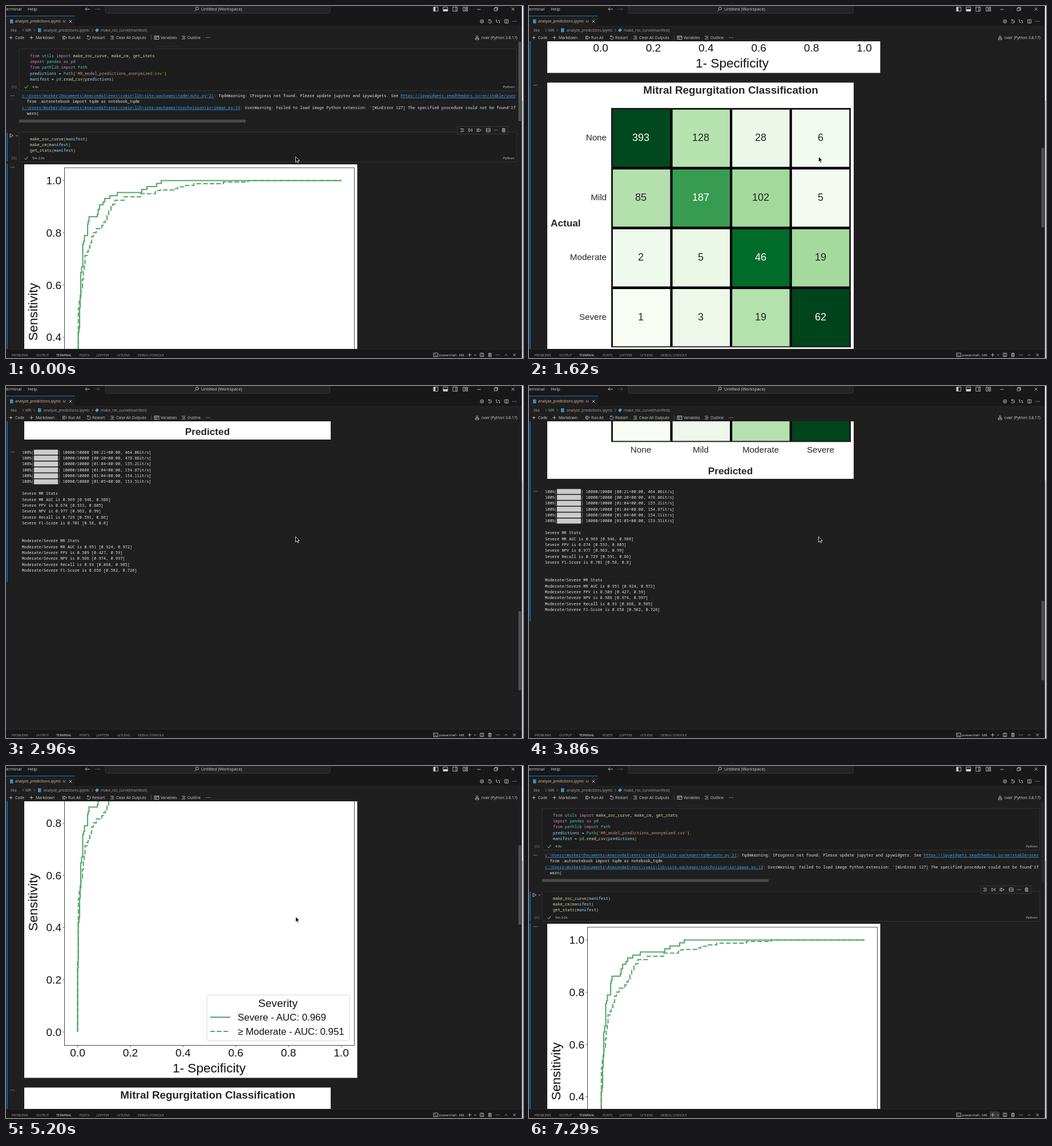
An HTML page for the animation above (7.46 s loop, 906 by 618 pixels).

```html
<!DOCTYPE html>
<html lang="en">
<head>
<meta charset="utf-8">
<title>Notebook scroll</title>
<style>
html, body { margin: 0; width: 100%; height: 100%; overflow: hidden; background: #1f1f1f; }
svg { display: block; width: 100vw; height: 100vh; }
text { white-space: pre; font-family: "Open Sans", "Noto Sans", sans-serif; }
.mono { font-family: "Noto Sans Mono", "DejaVu Sans Mono", monospace; font-weight: 500; }
.plot { font-family: "Liberation Sans", Arial, sans-serif; }
</style>
</head>
<body>
<svg id="stage" viewBox="0 0 906 618" preserveAspectRatio="none"></svg>
<script>
const GREEN = "#55a868", INK = "#262626", GREY = "#d2d2d2", DIM = "#a2a2a2", BLUE = "#0078d4";
const esc = s => String(s).replace(/&/g, "&amp;").replace(/</g, "&lt;");

const rect = (x, y, w, h, fill, more = "") =>
  `<rect x="${x}" y="${y}" width="${w}" height="${h}" fill="${fill}" ${more}/>`;
const line = (d, stroke, w = 0.8, more = "") =>
  `<path d="${d}" fill="none" stroke="${stroke}" stroke-width="${w}" ${more}/>`;
// y is the middle of the letters
const text = (x, y, s, size = 6.7, fill = GREY, more = "") =>
  `<text x="${x}" y="${y + size * 0.36}" font-size="${size}" fill="${fill}" ${more}>${esc(s)}</text>`;
const plotText = (x, y, s, size, anchor = "middle", fill = INK, more = "") =>
  text(x, y, s, size, fill, `class="plot" text-anchor="${anchor}" ${more}`);

// {letter} switches the colour of the text after it
const PEN = { k: "#c586c0", m: "#4ec9b0", f: "#dcdcaa", v: "#9cdcfe", s: "#ce9178",
  b: "#ffd700", w: "#e0e0e0", u: "#3ea6f5" };
function mono(x, y, src) {
  const bits = src.split(/\{(\w)\}/);
  let spans = esc(bits[0]);
  for (let i = 1; i < bits.length; i += 2)
    spans += `<tspan fill="${PEN[bits[i]]}"${bits[i] === "u" ? ' text-decoration="underline"' : ""}>${esc(bits[i + 1])}</tspan>`;
  return `<text class="mono" x="${x}" y="${y + 2.5}" font-size="7" fill="${PEN.w}">${spans}</text>`;
}
const PITCH = 10.38;
const block = (x, y, lines) => lines.map((s, i) => mono(x, y + i * PITCH, s)).join("");

const ICON = {
  plus: "M-3 0H3M0-3V3",
  close: "M-2.3-2.3L2.3 2.3M2.3-2.3L-2.3 2.3",
  down: "M-1.7-.8L0 .9L1.7-.8",
  up: "M-2.2 1.1L0-1.1L2.2 1.1",
  right: "M-1-2.2L1.2 0L-1 2.2",
  dots: "M-3.3 0h1.2M-.6 0h1.2M2.1 0h1.2",
  split: "M-3-3H3V3H-3ZM0-3V3",
  rows: "M-3.3-3H3.3V3H-3.3ZM-3.3 0H3.3",
  trash: "M-3-2.2H3M-1-2.2V-3.2H1V-2.2M-2.2-2.2V3.2H2.2V-2.2M-.7-.8V2M.7-.8V2",
  play: "M-2.4-3.2L3 0L-2.4 3.2Z",
  playBar: "M-3-3V3L1 0ZM2.5-3V3",
  runAll: "M-3.5-3V3M-1.5-3L3.5 0L-1.5 3Z",
  loop: "M-2.2-2A3 3 0 1 1-3 .8M-2.4-3.6V-1.8H-.6",
  clock: "M-2.2-2A3 3 0 1 1-3 .8M-2.4-3.6V-1.8H-.6M0-1.4V.3L1.4 1",
  gear: "M-3 0a3 3 0 1 0 6 0a3 3 0 1 0-6 0M-1 0a1 1 0 1 0 2 0a1 1 0 1 0-2 0",
  diff: "M-2.6-3.2V1.5H0M2.6 3.2V-1.5H0M-3.4-2.4h1.6M1.8 2.4h1.6",
  list: "M-3-2.4H3.2M-1.2 0H3.2M-3 2.4H3.2",
  table: "M-4-3H4V3H-4ZM-4-1H4M-1.2-1V3",
  check: "M-3 .3L-1 2.6L3-2.6",
  find: "M-.9.9L-3.6 3.6M-1.6-1.2a2.5 2.5 0 1 0 5 0a2.5 2.5 0 1 0-5 0",
  back: "M4 0H-4M-1-3L-4 0L-1 3",
  forward: "M-4 0H4M1-3L4 0L1 3",
  box: "M-3-1.8H1.8V3H-3ZM-1.5-1.8V-3.2H3.2V1.6H1.8",
  prompt: "M-3.8-3.2H3.8V3.2H-3.8ZM-2.2-1.4L-.6 0L-2.2 1.4M.2 1.6H2.2",
  pane: "M-4-3.6H4V3.6H-4Z",
  tiles: "M-4-3.5H-.8V3.5H-4ZM1-3.5H4V-.6H1ZM1 .8H4V3.5H1Z",
  user: "M-1.6-1.6a1.6 1.6 0 1 0 3.2 0a1.6 1.6 0 1 0-3.2 0M-3 3.5V1H3V3.5Z"
};
const icon = (name, x, y, color = GREY, w = 0.8) =>
  line(ICON[name], color, w, `transform="translate(${x} ${y})"`);
const dots = (x, y) => icon("dots", x, y, GREY, 1.2);

// Vertical-then-horizontal staircase through [x, y] corners
const stairs = pts => "M" + pts[0] + pts.slice(1).map(([x, y]) => `V${y}H${x}`).join("");

const SEVERE = [[125.5, 765], [126.5, 652], [128, 572], [129, 565], [130, 530], [131, 512], [132.5, 468],
  [134.5, 458], [136, 418], [137.5, 413], [143, 403], [144, 383], [145.5, 378], [160, 370], [161.5, 366],
  [164, 357], [170, 349], [173, 344], [182, 338], [195, 333], [238, 327.5], [247, 322], [264, 317],
  [272, 311.5], [588, 306.5]];
const MODERATE = [[125.5, 765], [126.8, 640], [128.5, 531], [130, 518], [131.5, 508], [134, 495], [135.5, 480],
  [137, 465], [138.5, 452], [142, 438], [144, 432], [147, 425], [150, 416], [153, 405], [158, 398],
  [168, 391], [171, 385], [174, 380], [177, 375], [180, 368], [184, 360], [187, 352], [191, 348],
  [207, 341], [236, 335], [262, 329.5], [270, 324], [294, 323], [301, 320.5], [315, 317.5], [329, 315],
  [381, 312], [424, 309], [588, 306.5]];

function rocFigure() {
  let out = rect(32, 278, 583.5, 567.5, "#fff") +
    rect(102.5, 284, 508, 504.5, "none", `stroke="#333" stroke-width=".9"`);
  for (let i = 0; i <= 5; i++) {
    const x = 125.5 + 92.4 * i, y = 765 - 91.7 * i, label = (i / 5).toFixed(1);
    out += line(`M99.5 ${y}h3M${x} 788.5v3`, "#333") +
      plotText(97, y, label, 19.1, "end", "#111") + plotText(x, 801, label, 19.1, "middle", "#111");
  }
  const dash = `stroke-dasharray="8 3.6"`;
  return out +
    plotText(47, 537, "Sensitivity", 22.6, "middle", "#111", `transform="rotate(-90 47 537)"`) +
    plotText(356, 828, "1- Specificity", 22.6, "middle", "#111") +
    line(stairs(MODERATE), GREEN, 2.1, dash) + line(stairs(SEVERE), GREEN, 2.1) +
    rect(352, 700, 250, 80, "#fff", `rx="2.5" stroke="#d6d6d6" stroke-width="1"`) +
    plotText(476.5, 714, "Severity", 19.1, "middle", "#111") +
    line("M358 739H393", GREEN, 2.1) + line("M358 764H393", GREEN, 2.1, dash) +
    plotText(406, 739, "Severe - AUC: 0.969", 16.9, "start", "#111") +
    plotText(406, 764, "≥ Moderate - AUC: 0.951", 16.9, "start", "#111");
}

const GRADES = ["None", "Mild", "Moderate", "Severe"];
const COUNTS = [[393, 128, 28, 6], [85, 187, 102, 5], [2, 5, 46, 19], [1, 3, 19, 62]];
const SHADES = [
  ["#00481d", "#b5e2ae", "#ecf7e9", "#f3faf0"], ["#b3e0ac", "#379c52", "#a3da9c", "#f4faf1"],
  ["#f0f9ed", "#ebf7e7", "#006b2b", "#a4da9d"], ["#f7fcf5", "#eef8ea", "#b4e1ad", "#00441b"]];

function matrixFigure() {
  const bold = `font-weight="700"`;
  let out = rect(32, 862.5, 537, 529.5, "#fff") +
    plotText(353.5, 875.5, "Mitral Regurgitation Classification", 18.9, "middle", INK, bold) +
    rect(144, 907, 420, 420.3, "#1a1a1a") + rect(147, 910, 414, 414.5, "#000");
  COUNTS.forEach((row, r) => {
    const mid = 958.7 + 105.1 * r;
    out += plotText(136, mid, GRADES[r], 15.2, "end") +
      plotText(196 + 105 * r, 1341, GRADES[r], 15.2);
    row.forEach((n, c) => {
      const dark = parseInt(SHADES[r][c].slice(1, 3), 16) < 100;
      out += rect(147 + 104.6 * c, 910 + 105 * r, 100.4, 100.4, SHADES[r][c]) +
        plotText(196 + 105 * c, mid, n, 18, "middle", dark ? "#fff" : INK);
    });
  });
  return out + plotText(38, 1109, "Actual", 17.2, "start", INK, bold) +
    plotText(353, 1377.5, "Predicted", 17.2, "middle", INK, bold);
}

function stats(name, auc, ppv, npv, recall, f1) {
  const row = (label, v) => `${name} ${label} is ${v}`;
  return [`${name} MR Stats`, row("MR AUC", auc), row("PPV", ppv), row("NPV", npv),
    row("Recall", recall), row("F1-Score", f1)];
}

function statsOutput() {
  const runs = ["00:21 464.06", "00:20 478.86", "01:04 155.21", "01:04 154.87", "01:04 154.11", "01:05 153.51"];
  const bars = runs.map((_, i) => rect(49, 1409.8 + i * PITCH, 42, 8.8, "#cccccc")).join("");
  const progress = runs.map(s => {
    const [took, rate] = s.split(" ");
    return `100%|${" ".repeat(10)}| 10000/10000 [${took}<00:00, ${rate}it/s]`;
  });
  return bars + block(28, 1414, [...progress, "",
    ...stats("Severe", "0.969 [0.946, 0.986]", "0.674 [0.533, 0.805]", "0.977 [0.963, 0.99]",
      "0.729 [0.591, 0.86]", "0.701 [0.58, 0.8]"), "", "",
    ...stats("Moderate/Severe", "0.951 [0.924, 0.972]", "0.509 [0.427, 0.59]", "0.986 [0.974, 0.997]",
      "0.93 [0.868, 0.985]", "0.658 [0.582, 0.726]")]);
}

function cell(top, height, count, time, lines) {
  const foot = top + height - 6.5;
  return rect(23, top, 872, height, "#1d1d1d", `stroke="#373737" stroke-width=".8"`) +
    block(42, top + 11.5, lines) + text(9, foot, count, 5.6, DIM, `class="mono"`) +
    icon("check", 35.5, foot, "#89d185", 1) + text(46, foot, time, 5.9) +
    text(891, foot, "Python", 6.1, GREY, `text-anchor="end"`);
}

function notebook() {
  const site = "{u}c:\\Users\\Worker\\Documents\\Anaconda3\\envs\\cvair\\lib\\site-packages\\";
  return rect(261, 70, 43, 1.5, "#282828") +
    cell(75.5, 73, "[1]", "4.9s", [
      "{k}from {m}utils {k}import {f}make_roc_curve{w}, {f}make_cm{w}, {f}get_stats",
      "{k}import {m}pandas {k}as {m}pd",
      "{k}from {m}pathlib {k}import {m}Path",
      "{v}predictions{w} = {m}Path{b}({s}'MR_model_predictions_anonymized.csv'{b})",
      "{v}manifest{w} = {m}pd{w}.{f}read_csv{b}({v}predictions{b})"]) +
    block(28, 157.5, [
      site + "tqdm\\auto.py:21{w}: TqdmWarning: IProgress not found. Please update jupyter and ipywidgets. See {u}https://ipywidgets.readthedocs.io/en/stable/user",
      "  from .autonotebook import tqdm as notebook_tqdm",
      site + "torchvision\\io\\image.py:13{w}: UserWarning: Failed to load image Python extension: '[WinError 127] The specified procedure could not be found'If",
      "  warn("]) +
    rect(23, 199.5, 397, 5, "#4b4b4b") +
    cell(221.5, 52, "[3]", "5m 2.0s", ["make_roc_curve", "make_cm", "get_stats"]
      .map(f => `{f}${f}{b}({v}manifest{b})`)) +
    rect(791, 211.5, 89, 13.5, "#1f1f1f", `stroke="#3c3c3c" stroke-width=".8"`) +
    [["list", 799], ["playBar", 814], ["runAll", 829], ["rows", 845], ["trash", 872]]
      .map(([n, x]) => icon(n, x, 218)).join("") + dots(858.5, 218) +
    icon("play", 9.5, 227.5) + icon("down", 18.5, 227.5) +
    [157.5, 283, 867, 1414].map(y => dots(11.5, y)).join("") +
    rect(1.2, 222, 1.6, 51, BLUE) + rect(1.2, 277, 1.6, 1365, BLUE) +
    rocFigure() + matrixFigure() + statsOutput();
}

function header() {
  const tools = [["plus", 8.5, 16, "Code"], ["plus", 44.5, 52, "Markdown"], ["runAll", 103, 109, "Run All"],
    ["loop", 145, 151, "Restart"], ["list", 186, 193, "Clear All Outputs"], ["table", 264, 271, "Variables"],
    ["list", 311, 318, "Outline"]];
  return rect(0, 0, 906, 62, "#1f1f1f") + rect(0, 0, 906, 36, "#181818") +
    rect(0, 17, 121, 19.5, "#1f1f1f") + rect(0, 17, 121, 1, BLUE) + rect(121, 35.5, 785, 0.8, "#2b2b2b") +
    text(27.5, 5.5, "Terminal", 7.6, GREY, `text-anchor="end"`) + text(38, 5.5, "Help", 7.8) +
    icon("back", 143, 5.5) + icon("forward", 160, 5.5, "#5c5c5c") +
    rect(174, -6, 394, 19, "#242424", `rx="3" stroke="#3b3b3b" stroke-width=".8"`) +
    icon("find", 334, 5.5) + text(342, 5.5, "Untitled (Workspace)", 7.4) +
    [753, 770, 787].map(x => icon("pane", x, 5.5, "#d7d7d7")).join("") +
    rect(749.5, 2, 3, 7, "#d7d7d7") + rect(766.5, 5.5, 7.5, 3.5, "#d7d7d7") + line("M788.5 2V9", "#d7d7d7") +
    icon("tiles", 805, 5.5, "#d7d7d7") + line("M825.5 6H832", GREY) +
    icon("box", 858.5, 5.5) + icon("close", 888.5, 5.5, GREY, 1) +
    rect(7, 23.5, 5.5, 7, "#3b8fb8", `rx="1"`) + text(16, 27, "analyze_predictions.ipynb", 6.65, "#e2c08d") +
    text(99.5, 27, "M", 5.8, "#c8a878") + icon("close", 113, 27, "#e0e0e0", 0.9) +
    [["gear", 834], ["clock", 848], ["diff", 862], ["split", 877]].map(([n, x]) => icon(n, x, 27)).join("") +
    dots(891, 27) +
    text(8, 42.5, "Ilka", 6.65, DIM) + text(34, 42.5, "MR", 6.65, DIM) +
    [30, 49.5, 151.5].map(x => icon("right", x, 42.5, DIM, 0.7)).join("") +
    rect(56, 39, 5.5, 7, "#3b8fb8", `rx="1"`) + text(66, 42.5, "analyze_predictions.ipynb", 6.65, DIM) +
    `<path d="M156 43L159.5 39L163 42L159.5 46Z" fill="#4ba3d8"/>` +
    text(166, 42.5, "make_roc_curve(manifest)", 6.65, DIM) +
    tools.map(([n, ix, x, s]) => icon(n, ix, 55.5) + text(x, 55.5, s)).join("") +
    line("M254.5 51V60", "#5a5a5a") + dots(354, 55.5) +
    icon("user", 825.5, 55.5) + text(896, 55.5, "cvair (Python 3.8.17)", 6.7, GREY, `text-anchor="end"`);
}

function footer() {
  const tabs = [[10, "PROBLEMS"], [53, "OUTPUT"], [88, "TERMINAL"], [129, "PORTS"], [159, "JUPYTER"],
    [195, "GITLENS"], [231, "DEBUG CONSOLE"]];
  return rect(0, 602, 906, 16, "#181818") + rect(0, 602, 906, 0.8, "#2b2b2b") +
    tabs.map(([x, s]) => text(x, 613, s, 5.6, s === "TERMINAL" ? "#f0f0f0" : DIM)).join("") +
    rect(807.5, 606.5, 17, 12, "#383838", `id="hover" rx="2"`) +
    icon("prompt", 753, 612.5) + text(759, 612.5, "powershell - MR", 5.9) +
    [["plus", 812.5], ["down", 822], ["split", 834], ["trash", 848], ["up", 876.5], ["close", 891]]
      .map(([n, x]) => icon(n, x, 612.5)).join("") + dots(862, 612.5);
}

// Strip of the desktop beside the window
const desktop = rect(904, 0, 2, 618, "#c4c4c4") + rect(904, 0, 2, 166, "#ececec");

const stage = document.getElementById("stage");
stage.innerHTML =
  `<clipPath id="view"><rect x="0" y="62" width="904" height="540"/></clipPath>` +
  rect(0, 0, 906, 618, "#1f1f1f") +
  `<g clip-path="url(#view)"><g id="page">${notebook()}</g></g>` +
  rect(898, 63, 5, 139, "#4f4f4f", `id="thumb"`) +
  header() + footer() + desktop +
  `<path id="arrow" d="M0 0V9.6L2.2 7.5L3.8 10.9L5.3 10.2L3.8 7H6.8Z" fill="#000" stroke="#fff" stroke-width=".8"/>`;

const [page, thumb, arrow, hover] = ["page", "thumb", "arrow", "hover"].map(id => document.getElementById(id));

// Picture clock: 150 ms per tick, a few ticks 10 ms shorter
const LOOP = 7460, SHORT = [0, 3, 8, 11, 28, 37], STARTS = [0];
for (let i = 0; i < 49; i++) STARTS.push(STARTS[i] + (SHORT.includes(i) ? 140 : 150));

const SCROLL = [[0, 0], [1, 40], [5, 356], [11, 728], [15, 1108], [16, 1230], [17, 1296], [18, 1296],
  [20, 1298], [23, 1298], [24, 1285], [26, 1229], [28, 1040], [35, 298], [37, 185], [40, 75], [43, 20], [46, 1]];
const POINTER_X = [[40, 507.5], [46, 815]], POINTER_Y = [[40, 264.5], [46, 622]];

function at(keys, k) {
  const i = keys.findIndex(p => p[0] > k);
  if (i < 0) return keys[keys.length - 1][1];
  if (i === 0) return keys[0][1];
  const [a, va] = keys[i - 1], [b, vb] = keys[i];
  return va + (vb - va) * (k - a) / (b - a);
}

function draw(now) {
  const t = now % LOOP;
  const k = STARTS.filter(s => s <= t).length - 1;
  const y = Math.round(at(SCROLL, k));
  page.setAttribute("transform", `translate(0 ${-y})`);
  thumb.setAttribute("y", 63 + y * 0.256);
  thumb.setAttribute("opacity", k < 49 ? 1 : 0.2);
  arrow.setAttribute("transform", `translate(${at(POINTER_X, k)} ${at(POINTER_Y, k)})`);
  hover.setAttribute("opacity", k < 46 ? 0 : 1);
}

const begin = performance.now();
(function tick() {
  draw(performance.now() - begin);
  requestAnimationFrame(tick);
})();
</script>
</body>
</html>
```
